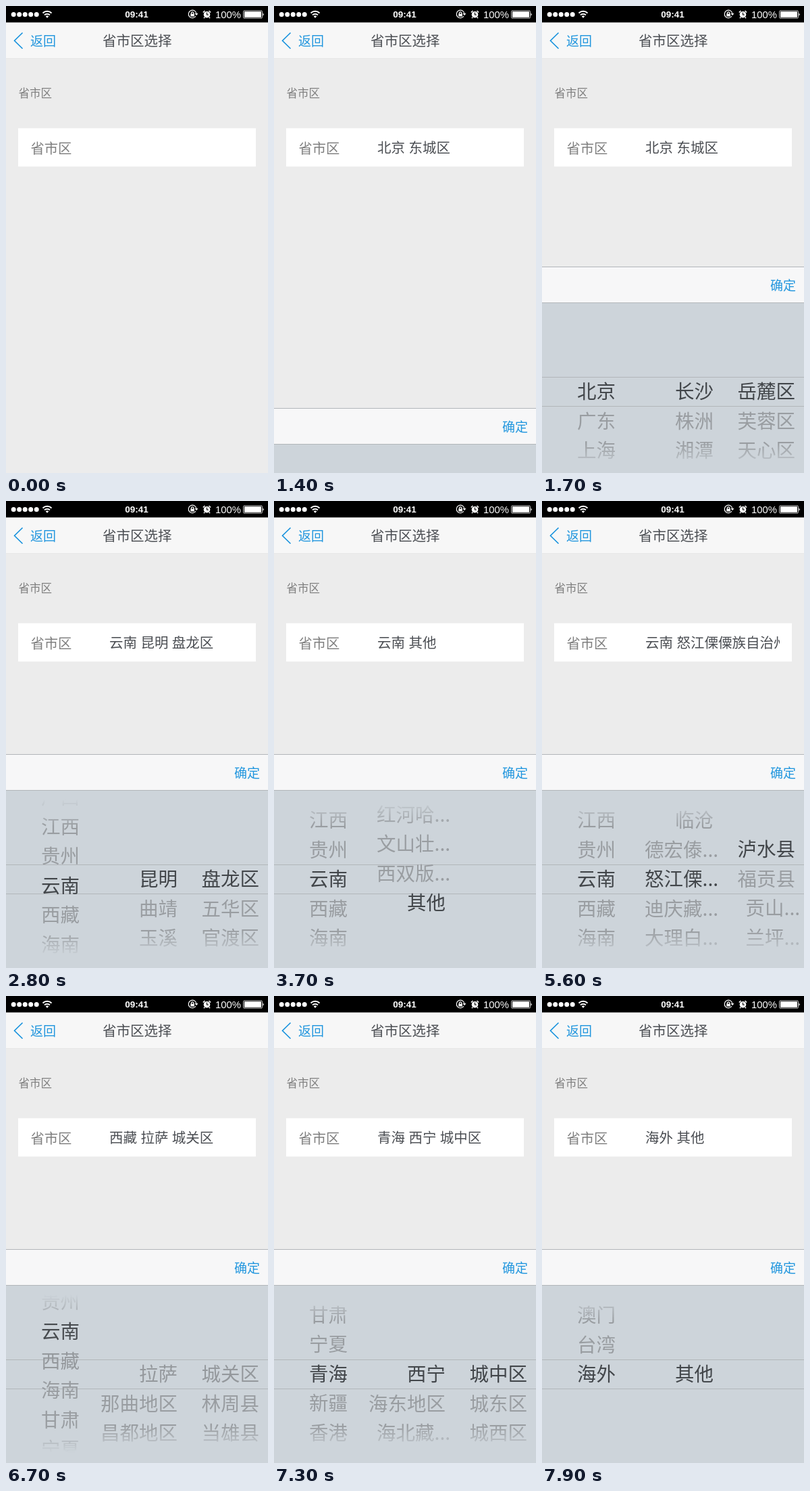
An HTML page for the animation above (8 s loop, 388 by 690 pixels).

```html
<!DOCTYPE html>
<html lang="zh-CN">
<head>
<meta charset="utf-8">
<title>省市区选择</title>
<style>
html, body { margin: 0; width: 100%; height: 100%; overflow: hidden; background: #ececec; }
svg { display: block; width: 388px; height: 690px; }
text { font-family: "Noto Sans CJK SC", "Noto Sans CJK", sans-serif; font-weight: 300; fill: #4a4d52; }
.status text { font-family: "Liberation Sans", Arial, sans-serif; fill: #fff; }
.blue { fill: #2196de; font-size: 19px; }
.gray { fill: #7e7e7e; }
.row { font-size: 28.5px; }
.line { stroke: #b2b6ba; stroke-width: 1; }
#value { word-spacing: .8px; }
</style>
</head>
<body>
<svg viewBox="0 0 388 690">
  <defs>
    <linearGradient id="fade" gradientUnits="userSpaceOnUse" x1="0" y1="428" x2="0" y2="690">
      <stop offset=".05" stop-color="#000"/>
      <stop offset=".2" stop-color="#fff"/>
      <stop offset=".79" stop-color="#fff"/>
      <stop offset=".94" stop-color="#000"/>
    </linearGradient>
    <mask id="wheelMask" maskUnits="userSpaceOnUse" x="0" y="428" width="388" height="262">
      <rect y="428" width="388" height="262" fill="url(#fade)"/>
    </mask>
    <clipPath id="field"><rect x="150" y="181" width="202" height="56"/></clipPath>
  </defs>

  <rect width="388" height="690" fill="#ececec"/>
  <rect y="24" width="388" height="53" fill="#f7f7f7"/>
  <path d="M0 77.5H388" stroke="#e7e7e7"/>
  <g class="status">
    <rect width="388" height="24.3" fill="#000"/>
    <g id="dots" fill="#fff"></g>
    <path d="M54.5 10.5A9.3 9.3 0 0 1 67.5 10.5M57 13.3A5.8 5.8 0 0 1 65 13.3" fill="none" stroke="#fff" stroke-width="2"/>
    <path d="M58.7 15.2A3.4 3.4 0 0 1 63.3 15.2L61 17.7Z" fill="#fff"/>
    <text x="193.5" y="17" font-size="13.5" style="font-weight:700" text-anchor="middle">09:41</text>
    <g fill="none" stroke="#fff" stroke-width="1.2">
      <path d="M281 15A5.8 5.8 0 1 1 281.8 11"/>
      <path d="M274.4 12V10.5A1.7 1.7 0 0 1 277.8 10.5V12"/>
    </g>
    <path d="M273.3 11.5H278.9V15.5H273.3ZM279.5 11H284.5L282 14Z" fill="#fff"/>
    <circle cx="297.5" cy="12.7" r="4.8" fill="#fff"/>
    <path d="M297.5 9.5V13H300" fill="none" stroke="#000" stroke-width="1.1"/>
    <path d="M291.8 9.5L294.5 7M303.2 9.5L300.5 7M294.3 16.5L293 18M300.7 16.5L302 18" stroke="#fff" stroke-width="1.5"/>
    <text x="310" y="17.5" font-size="14.8" style="font-weight:400">100%</text>
    <rect x="351.5" y="7" width="28" height="11" rx="1.5" fill="none" stroke="#fff" stroke-width=".8"/>
    <rect x="353" y="8.3" width="25" height="8.4" rx=".5" fill="#fff"/>
    <path d="M380.5 10.5A2.2 2.2 0 0 1 380.5 14.5Z" fill="#fff"/>
  </g>

  <path d="M24.5 39.5L12.5 51.3L24.5 63" fill="none" stroke="#1490dd" stroke-width="1.6"/>
  <text class="blue" x="36" y="58.5">返回</text>
  <text x="194.3" y="58.7" font-size="20.5" text-anchor="middle">省市区选择</text>
  <text class="gray" x="18.5" y="135.3" font-size="16.5">省市区</text>
  <rect x="18" y="180.6" width="352" height="56.6" fill="#fff"/>
  <text class="gray" x="36.5" y="217.7" font-size="20.3">省市区</text>
  <g clip-path="url(#field)"><text id="value" x="153" y="217.3" font-size="20.5"></text></g>

  <g id="picker">
    <rect y="374" width="388" height="54" fill="#f7f7f8"/>
    <path class="line" d="M0 374.5H388M0 427.5H388"/>
    <text class="blue" x="338" y="408.5">确定</text>
    <rect y="428" width="388" height="262" fill="#cdd4da"/>
    <path class="line" d="M0 537.5H388M0 580.5H388"/>
    <g id="wheels" mask="url(#wheelMask)"></g>
  </g>
</svg>
<script>
const LOOP = 8000, ROW = 43.6, CENTER = 558.5, SIZE = 28.5, FADE = 200;
const $ = id => document.getElementById(id);
const list = names => names ? names.split(' ') : [];

const provinces = list('北京 广东 上海 天津 重庆 辽宁 江苏 湖北 四川 陕西 河北 山西 河南 吉林 黑龙江 内蒙古 山东 安徽 浙江 福建 湖南 广西 江西 贵州 云南 西藏 海南 甘肃 宁夏 青海 新疆 香港 澳门 台湾 海外');
const yunnan = list('昆明 曲靖 玉溪 保山 昭通 丽江 普洱 临沧 德宏傣族景颇族自治州 怒江傈僳族自治州 迪庆藏族自治州 大理白族自治州 楚雄彝族自治州 红河哈尼族彝族自治州 文山壮族苗族自治州 西双版纳傣族自治州 其他');
const nujiang = list('泸水县 福贡县 贡山独龙族怒族自治县 兰坪白族普米族自治县 其他');

// moves: [time, row, easing power]; picks: [time, names, selected row]
const columns = [
  {
    right: 109, max: 4,
    moves: [[0, 0], [2200, 0], [2480, 7], [2900, 24, 3], [6400, 24], [6700, 25.43], [7200, 29, 3], [7300, 29], [7500, 31], [7850, 34, 3]],
    picks: [[0, provinces, 0], [2500, provinces, 24], [6690, provinces, 25], [6900, provinces, 29], [7550, provinces, 34]]
  },
  {
    right: 254, max: 4,
    moves: [[0, 0], [3300, 0], [3500, 3], [3833, 16, 3], [4500, 16], [4600, 13], [5211, 9, 3], [6690, 9], [6690, 0]],
    picks: [
      [0, list('长沙 株洲 湘潭 衡阳'), 0],
      [1900, list('东城区 西城区 崇文区 宣武区'), 0],
      [2500, yunnan, 0], [3500, yunnan, 16], [4660, yunnan, 9],
      [6690, list('拉萨 那曲地区 昌都地区 林芝地区'), 0],
      [6900, list('西宁 海东地区 海北藏族自治州 海南藏族自治州'), 0],
      [7550, list('其他'), 0]
    ]
  },
  {
    right: 375, max: 3,
    moves: [[0, 0], [5400, 0], [5600, 1], [5900, 2, 2], [6690, 2], [6690, 0]],
    picks: [
      [0, list('岳麓区 芙蓉区 天心区 开福区'), 0],
      [1900, [], 0],
      [2500, list('盘龙区 五华区 官渡区 西山区'), 0],
      [3500, [], 0],
      [4600, nujiang, 0], [5600, nujiang, 2],
      [6690, list('城关区 林周县 当雄县 尼木县'), 0],
      [6900, list('城中区 城东区 城西区 城北区'), 0],
      [7550, [], 0]
    ]
  }
];
const values = [
  [0, ''], [1300, '北京 东城区'], [2500, '云南 昆明 盘龙区'], [3500, '云南 其他'],
  [4600, '云南 怒江傈僳族自治州 泸水县'], [6690, '西藏 拉萨 城关区'],
  [6900, '青海 西宁 城中区'], [7550, '海外 其他']
];

const clamp = x => Math.min(1, Math.max(0, x));
const easeOut = (x, power = 1) => 1 - (1 - clamp(x)) ** power;
const stepAt = (steps, t) => steps.findLastIndex(s => s[0] <= t);

function rowAt(moves, t) {
  const i = stepAt(moves, t), a = moves[i], b = moves[i + 1];
  return b ? a[1] + (b[1] - a[1]) * easeOut((t - a[0]) / (b[0] - a[0]), b[2]) : a[1];
}

function addShape(parent, tag, attrs) {
  const el = document.createElementNS('http://www.w3.org/2000/svg', tag);
  for (const key in attrs) el.setAttribute(key, attrs[key]);
  return parent.appendChild(el);
}

function setText(el, text) {
  if (el.textContent !== text) el.textContent = text;
}

for (let i = 0; i < 5; i++) addShape($('dots'), 'circle', { cx: 11.2 + i * 8.5, cy: 12.5, r: 3.5 });
for (const col of columns) {
  col.rows = Array.from({ length: 9 }, () => addShape($('wheels'), 'text', { class: 'row' }));
}

// Long names lose their end and hang past the right edge.
function setName(el, name, { right, max }) {
  const long = name.length > max, keep = max - 1;
  setText(el, long ? name.slice(0, keep) + '...' : name);
  el.setAttribute('text-anchor', long ? 'start' : 'end');
  el.setAttribute('x', long ? right - keep * SIZE - 16.5 : right);
}

function mix(k) {
  const from = [153, 157, 161], to = [66, 70, 74];
  return `rgb(${from.map((c, i) => Math.round(c + (to[i] - c) * k))})`;
}

function drawColumn(col, t) {
  const pos = rowAt(col.moves, t), first = Math.round(pos) - 4;
  const n = stepAt(col.picks, t), [since, names, picked] = col.picks[n];
  const before = col.picks[n - 1];
  const k = n ? clamp((t - since) / FADE) : 1;
  col.rows.forEach((el, j) => {
    const i = first + j;
    setName(el, names[i] || '', col);
    el.setAttribute('y', CENTER + (i - pos) * ROW + SIZE * 0.375);
    const wasPicked = before && before[1] === names && before[2] === i;
    el.style.fill = mix(i === picked ? k : wasPicked ? 1 - k : 0);
  });
}

function draw(t) {
  const offset = Math.round(316 * (1 - easeOut((t - 1340) / 535, 3)));
  $('picker').setAttribute('transform', `translate(0 ${offset})`);
  setText($('value'), values[stepAt(values, t)][1]);
  columns.forEach(col => drawColumn(col, t));
}

const start = performance.now();
function tick() {
  draw((performance.now() - start) % LOOP);
  requestAnimationFrame(tick);
}
tick();
</script>
</body>
</html>
```
